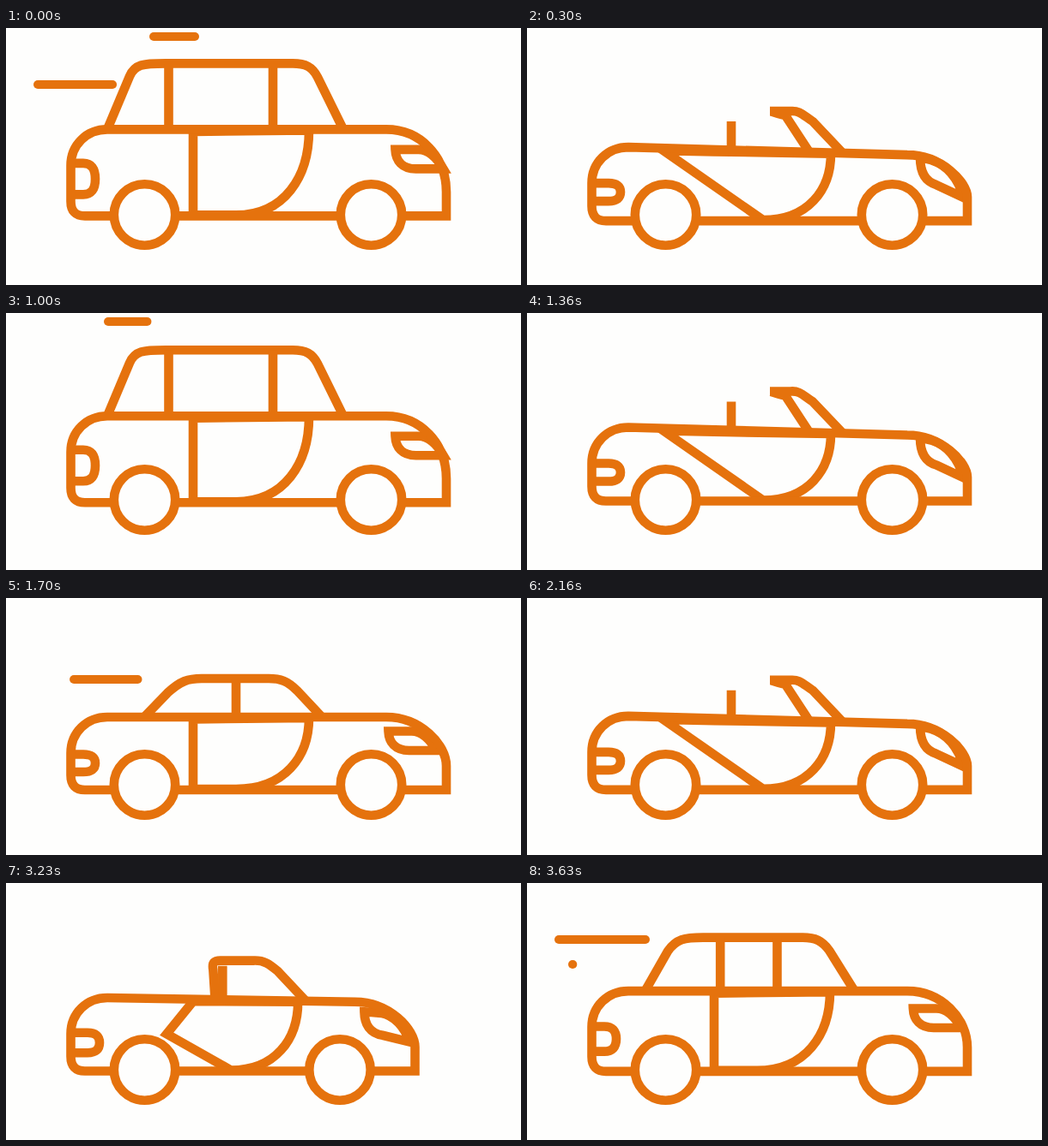
Write an HTML page that moves like this. It is 600 px wide and 300 px high and loops after 3.66 s.

```html
<!DOCTYPE html>
<html lang="en">
<head>
<meta charset="utf-8">
<title>Shape-shifting car</title>
<style>
  html, body { margin: 0; width: 100%; height: 100%; overflow: hidden; background: #fefefd; }
  svg { display: block; width: 600px; height: 300px; }
  path, circle { fill: none; stroke: #e5720d; stroke-width: 10.6; }
  circle { fill: #fefefd; }
  .dash { stroke-width: 10; stroke-linecap: round; }
</style>
</head>
<body>
<svg viewBox="0 0 600 300">
  <g id="dashes"></g>
  <g id="body">
    <path id="roof"/>
    <path id="pillars"/>
    <path id="door"/>
    <path id="head"/>
    <path id="tail"/>
    <path id="hull"/>
  </g>
  <circle cx="161.5" cy="218" r="35.7"/>
  <circle id="wheel" cy="218" r="35.7"/>
</svg>
<script>
const PERIOD = 915, MORPH = 66;
const el = id => document.getElementById(id);

// belt: rear y, front y; door: low corner x, y, curve start x, right x
// head: x, y, tilt; tail: top y, bottom y, right x; pillars: x, x, top y
const suv = {
  belt: [119, 119], nose: [513],
  roof: [118, 144, 57, 150, 43, 159, 42, 186, 334, 349, 42, 357, 46, 363, 58, 393],
  pillars: [189.5, 311, 42], door: [218, 219, 268, 353],
  head: [453.5, 142.5, 0], tail: [158.5, 195, 104]
};
const roadster = {
  belt: [134, 143], nose: [513],
  roof: [329, 301, 97, 285, 93, 284, 92, 283, 307, 318, 91, 322, 97, 333, 104, 368],
  pillars: [238, 238, 104], door: [159, 138, 275, 354],
  head: [458, 146, 1], tail: [176, 197, 109]
};
const coupe = {
  belt: [135, 135], nose: [436.5],
  roof: [150, 176, 107, 190, 93, 198, 90, 213, 268, 282, 90, 290, 93, 299, 103, 329],
  pillars: [268, 268, 90], door: [218, 219, 248, 325],
  head: [373, 156, 0], tail: [174.5, 200.5, 109]
};
const sedan = {
  belt: [135, 135], nose: [513],
  roof: [161, 188, 107, 203, 93, 212, 90, 228, 306, 320, 90, 328, 93, 339, 104, 368],
  pillars: [268, 268, 90], door: [218, 219, 268, 353],
  head: [445.5, 151.5, 0], tail: [178.5, 199, 104]
};

// Middle of each change and the car that follows
const changes = [[-31, suv], [258, roadster], [487, coupe], [686, sedan], [884, suv]];

// start, y, right x, left x
const dashes = [
  [530, 71, 185, 87], [598, 106, 109, 8], [746, 95, 153.5, 53],
  [820, 66, 138, 37], [887, 10, 220, 119]
].map(([start, y, right, left]) => {
  const path = document.createElementNS("http://www.w3.org/2000/svg", "path");
  path.setAttribute("class", "dash");
  el("dashes").append(path);
  return { start, y, right, left, path };
});

const lerp = (a, b, k) => a + (b - a) * k;
const ease = x => { x = Math.min(1, Math.max(0, x)); return x * x * (3 - 2 * x); };
const set = (id, d) => el(id).setAttribute("d", d);

function carAt(p) {
  let i = 1;
  while (i < changes.length - 1 && p > changes[i][0] + MORPH / 2) i++;
  const from = changes[i - 1][1], [mid, to] = changes[i];
  const k = ease((p - mid) / MORPH + 0.5);
  const car = {};
  for (const key in from) car[key] = from[key].map((v, n) => lerp(v, to[key][n], k));
  return car;
}

function drawCar(p) {
  const { belt: [rear, front], nose: [nose], roof: r, pillars, door, head, tail } = carAt(p);
  const hood = nose - 70;
  const beltAt = x => lerp(rear, front, (x - 118) / (hood - 118));

  set("hull", `M${nose - 88} 220H92Q75.5 220 75.5 203V${rear + 42}
    C75.5 ${rear + 18} 94 ${rear} 118 ${rear}L${hood} ${front}
    C${nose - 30} ${front} ${nose} ${front + 32} ${nose} 192V220H${nose - 60}`);

  const top = r[6];
  set("roof", `M${r[0]} ${beltAt(r[0])}L${r[1]} ${r[2]}C${r[3]} ${r[4]} ${r[5]} ${top} ${r[7]} ${top}
    H${r[8]}C${r[9]} ${r[10]} ${r[11]} ${r[12]} ${r[13]} ${r[14]}L${r[15]} ${beltAt(r[15])}`);

  const [p1, p2, pTop] = pillars;
  set("pillars", [p1, p2].map(x => `M${x} ${pTop}V${beltAt(x)}`).join(""));

  const [cx, cy, bx, dx] = door, dTop = beltAt(dx) + 1;
  set("door", `M218 ${beltAt(218) + 2.5}L${cx} ${cy}L${bx} 219
    C${lerp(bx, dx, 0.66)} 219 ${dx} ${lerp(219, dTop, 0.45)} ${dx} ${dTop}Z`);

  const [hx, hy, tilt] = head;
  const at = (x, y, tx, ty) => `${hx + lerp(x, tx, tilt)} ${hy + lerp(y, ty, tilt)} `;
  set("head", `M${at(0, 0, 0, 0)}L${at(27, 0, 13, 3)}
    C${at(39, 0, 32, 9)}${at(48, 9, 44, 24)}${at(56, 22.5, 51, 47)}
    L${at(24, 22.5, 19, 32)}C${at(8, 22.5, 5, 28)}${at(0.5, 13, 0, 16)}${at(0, 0, 0, 0)}Z`);

  const [t1, t2, tx] = tail, tm = (t1 + t2) / 2;
  set("tail", `M75 ${t1}H${tx - 14}Q${tx} ${t1} ${tx} ${tm}Q${tx} ${t2} ${tx - 14} ${t2}H75`);

  const bounce = 2.9 - 3.5 * Math.cos((p - 8) / PERIOD * 4 * Math.PI);
  el("body").setAttribute("transform", `translate(0 ${bounce})`);
  el("wheel").setAttribute("cx", nose - 87.5);
}

function drawDashes(p) {
  for (const { start, y, right, left, path } of dashes) {
    const age = (p - start + PERIOD) % PERIOD;
    const head = lerp(right, left, ease(age / 60));
    const end = lerp(right, left, ease((age - 82) / 60));
    path.setAttribute("d", age < 142 ? `M${head} ${y}H${end + 0.01}` : "");
  }
}

function draw() {
  const p = performance.now() % PERIOD;
  drawCar(p);
  drawDashes(p);
  requestAnimationFrame(draw);
}
draw();
</script>
</body>
</html>
```
